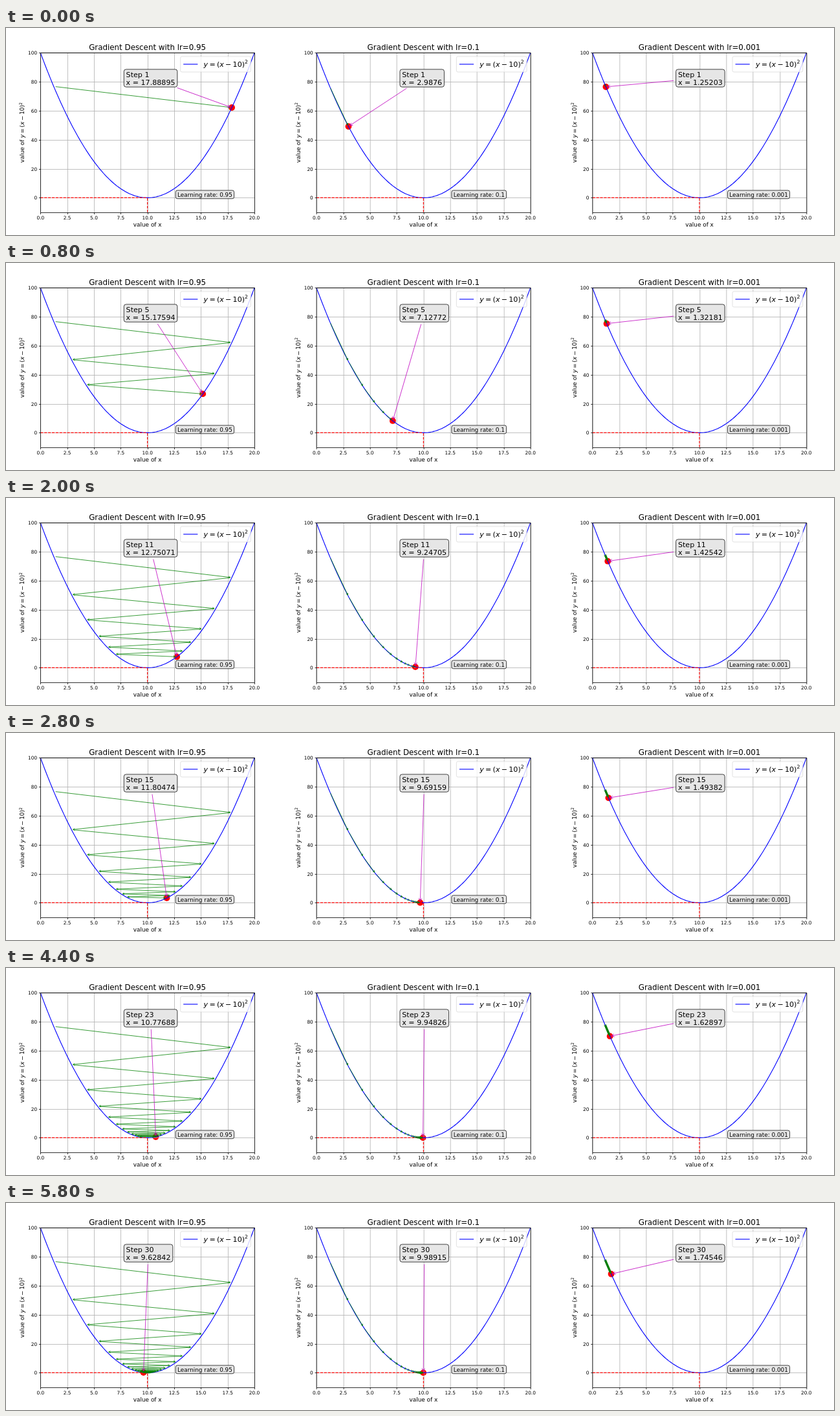
An HTML page with a canvas for the animation above (6 s loop, 1280 by 320 pixels).

```html
<!DOCTYPE html>
<html lang="en">
<head>
<meta charset="utf-8">
<title>Gradient descent</title>
<style>
  html, body { margin: 0; width: 100%; height: 100%; overflow: hidden; background: #fff; }
  canvas { display: block; }
</style>
</head>
<body>
<canvas id="stage" width="1280" height="320"></canvas>
<script>
const ctx = document.getElementById("stage").getContext("2d");
const STEP_MS = 200, STEPS = 30, PANEL = 1280 / 3;
const RATES = ["0.95", "0.1", "0.001"];
const START_X = 1.2345;
const LEFT = 160 / 3, RIGHT = 384, TOP = 38.4, BOTTOM = 284.8;

const pt = n => n * 20 / 27;              // points to pixels
const px = x => LEFT + x * (RIGHT - LEFT) / 20;
const py = y => BOTTOM - (y + 10) * 2.24;
const parabola = x => (x - 10) ** 2;
const descend = (rate, n) => 10 + (START_X - 10) * (1 - 2 * rate) ** n;

function stroke(points, color, width, dash = []) {
  ctx.strokeStyle = color;
  ctx.lineWidth = width;
  ctx.setLineDash(dash);
  ctx.beginPath();
  points.forEach(([x, y]) => ctx.lineTo(x, y));
  ctx.stroke();
}

function text(str, x, y, points, align = "left", style = "") {
  ctx.font = `${style} ${pt(points)}px "DejaVu Sans", sans-serif`;
  ctx.textAlign = align;
  ctx.fillStyle = "#000";
  ctx.fillText(str, x, y);
  return ctx.measureText(str).width;
}

function roundBox(x, y, w, h, radius, fill, edge) {
  ctx.beginPath();
  ctx.roundRect(x, y, w, h, radius);
  ctx.fillStyle = fill;
  ctx.fill();
  ctx.setLineDash([]);
  ctx.strokeStyle = edge;
  ctx.lineWidth = pt(1);
  ctx.stroke();
}

function equation(x, y, points) {
  const gap = pt(points) * 0.2;
  const put = (str, style) => { x += text(str, x, y, points, "left", style); };
  put("y", "italic");
  x += gap; put("="); x += gap;
  put("(");
  put("x", "italic");
  x += gap; put("−"); x += gap;
  put("10)");
  text("2", x, y - pt(points) * 0.38, points * 0.7);
}

// A trim that is longer than what is left of the arrow is skipped.
function arrow([ax, ay], [bx, by], startTrims, points, color) {
  let start = 0, end = Math.hypot(bx - ax, by - ay);
  for (const trim of startTrims) if (end - start > trim) start += trim;
  if (end - start > pt(2)) end -= pt(2);
  const tip = end - pt(1.12), size = pt(points);
  ctx.save();
  ctx.translate(ax, ay);
  ctx.rotate(Math.atan2(by - ay, bx - ax));
  stroke([[start, 0], [tip, 0]], color, pt(1));
  stroke([[tip - size * 0.4, -size * 0.2], [tip, 0], [tip - size * 0.4, size * 0.2]], color, pt(1));
  ctx.restore();
}

function drawAxes() {
  const snap = v => Math.floor(v + 0.5) + 0.5;
  const l = snap(LEFT), r = snap(RIGHT), t = snap(TOP), b = snap(BOTTOM);
  for (let i = 0; i <= 8; i++) {
    const x = snap(px(i * 2.5));
    stroke([[x, t], [x, b]], "#b0b0b0", 0.8);
    stroke([[x, b], [x, b + pt(3.5)]], "#000", 0.8);
    text((i * 2.5).toFixed(1), px(i * 2.5), 296.2, 10, "center");
  }
  for (let v = 0; v <= 100; v += 20) {
    const y = snap(py(v));
    stroke([[l, y], [r, y]], "#b0b0b0", 0.8);
    stroke([[l - pt(3.5), y], [l, y]], "#000", 0.8);
    text(v, LEFT - pt(7), py(v) + 3, 10, "right");
  }
  const curve = Array.from({ length: 201 }, (_, i) => [px(i / 10), py(parabola(i / 10))]);
  stroke(curve, "#00f", pt(1.5));
  const dash = [pt(5.55), pt(2.4)];
  stroke([[px(0), py(0)], [px(10), py(0)]], "#f00", pt(1.5), dash);
  stroke([[px(10), BOTTOM], [px(10), py(0)]], "#f00", pt(1.5), dash);
  stroke([[l, t], [r, t], [r, b], [l, b], [l, t], [r, t]], "#000", 0.8);
}

function drawLabels(rate) {
  text("Gradient Descent with lr=" + rate, px(10), 34, 16, "center");
  text("value of x", px(10), 307, 12, "center");
  ctx.save();
  ctx.translate(28.2, 208.2);
  ctx.rotate(-Math.PI / 2);
  equation(text("value of ", 0, 0, 12), 0, 12);
  ctx.restore();
}

function drawLegend() {
  roundBox(269.7, 44, 108.7, 24, 2.2, "rgba(255,255,255,.8)", "rgba(204,204,204,.8)");
  stroke([[274.2, 56], [296.4, 56]], "#00f", pt(1.5));
  equation(305.6, 59.6, 15);
}

function drawRateBox(rate) {
  const label = "Learning rate: " + rate, x = px(12.8);
  const width = text(label, x, 260.6, 12);
  roundBox(x - 2.7, 251, width + 5.4, 12.8, 2.7, "#e6e6e6", "#000");
  text(label, x, 260.6, 12);
}

function drawCallout(step, value, target) {
  const x = px(8), pad = pt(4.5), top = 63.9, height = 27.3;
  const label = "x = " + Number(value.toFixed(5));
  const width = Math.max(text(label, x, 87.8, 15), text("Step " + step, x, 75.5, 15));
  const center = [x + width / 2, top + height / 2];
  const dx = target[0] - center[0], dy = target[1] - center[1];
  const exit = Math.min((width / 2 + pad) / Math.abs(dx), height / 2 / Math.abs(dy));
  arrow(center, target, [exit * Math.hypot(dx, dy) + 3.5], 15, "#bf00bf");
  roundBox(x - pad, top, width + 2 * pad, height, pad, "#e6e6e6", "#000");
  text("Step " + step, x, 75.5, 15);
  text(label, x, 87.8, 15);
}

function drawPanel(rate, step) {
  const position = n => {
    const x = descend(rate, n);
    return [px(x), py(parabola(x))];
  };
  const target = position(step);
  ctx.fillStyle = "#f00";
  ctx.beginPath();
  ctx.arc(...target, 4.9, 0, 2 * Math.PI);
  ctx.fill();
  drawAxes();
  drawLabels(rate);
  drawRateBox(rate);
  for (let n = 1; n <= step; n++) {
    arrow(position(n - 1), position(n), [pt(2), pt(2)], 10, "#008000");
  }
  drawCallout(step, descend(rate, step), target);
  drawLegend();
}

function draw() {
  const step = Math.floor(performance.now() / STEP_MS) % STEPS + 1;
  ctx.fillStyle = "#fff";
  ctx.fillRect(0, 0, 1280, 320);
  RATES.forEach((rate, i) => {
    ctx.save();
    ctx.translate(i * PANEL, 0);
    drawPanel(rate, step);
    ctx.restore();
  });
  requestAnimationFrame(draw);
}
draw();
</script>
</body>
</html>
```
